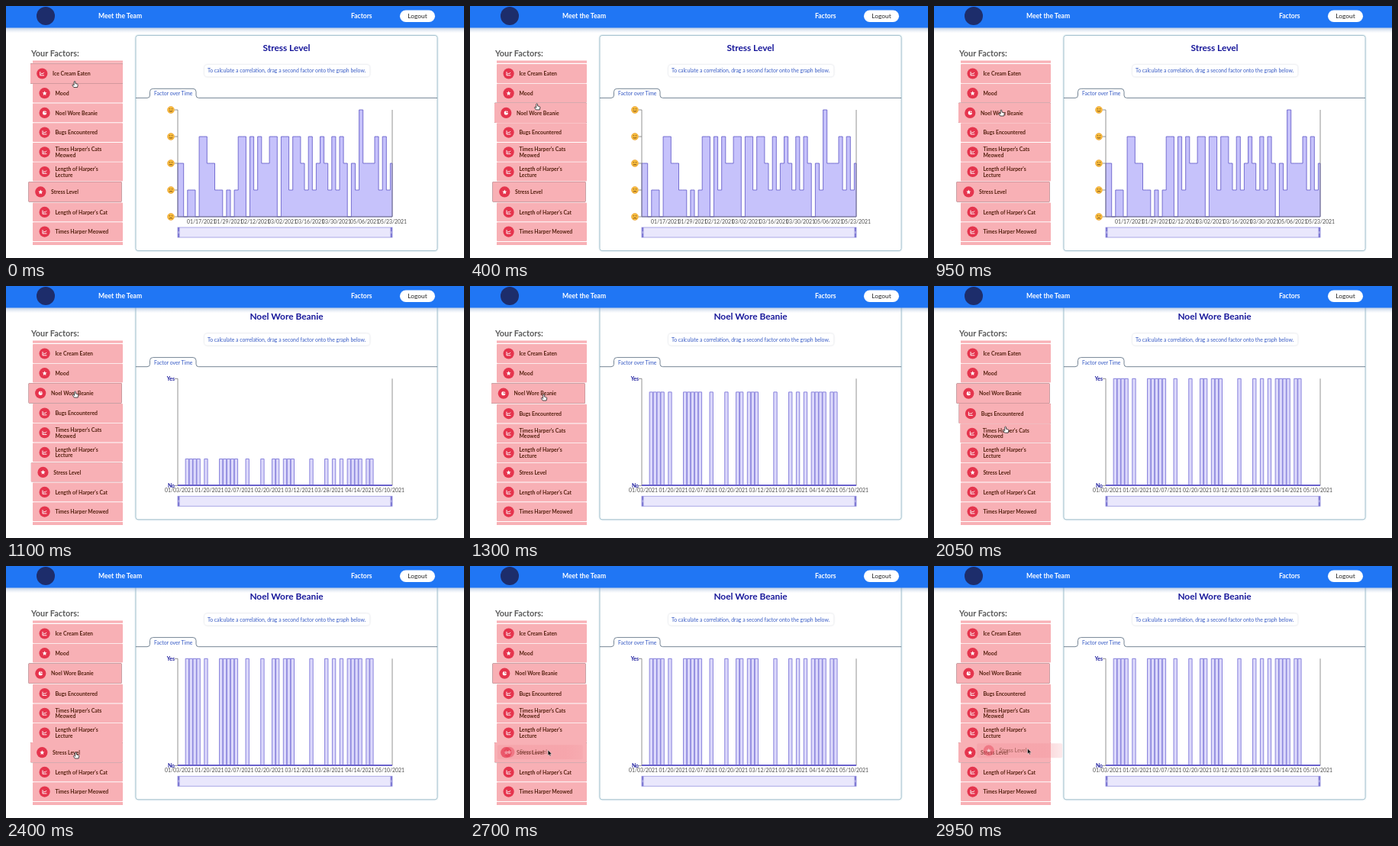
Animation of 600 by 330 pixels, one loop 3000 ms. Source, as an HTML page:

```html
<!DOCTYPE html>
<html lang="en">
<head>
<meta charset="utf-8">
<title>Factor dashboard</title>
<style>
html, body { margin: 0; width: 100%; height: 100%; overflow: hidden; background: #fff; }
svg { display: block; width: 600px; height: 330px; font-family: Lato, "Open Sans", sans-serif; }
text { white-space: pre; }
</style>
</head>
<body>
<svg id="stage" viewBox="0 0 600 330">
  <defs>
    <linearGradient id="glow" x2="0" y2="1">
      <stop stop-color="#6f93c4" stop-opacity=".5"/>
      <stop offset="1" stop-color="#b5c8e2" stop-opacity="0"/>
    </linearGradient>
    <linearGradient id="ghostFill">
      <stop offset=".8" stop-color="#f3959d" stop-opacity=".38"/>
      <stop offset="1" stop-color="#f3959d" stop-opacity=".2"/>
    </linearGradient>
  </defs>
</svg>
<script>
const LOOP = 3000, CLICK = 1050, DRAG = 2650, GROW = 400;
const PITCH = 25.7, FIRST = 88.5, EXTRA = 1.5;
const LEFT = 225, RIGHT = 506, TOP = 136, BASE = 276, SPAN = RIGHT - LEFT;
const PINK = '#f8b0b5', RED = '#e5344d', NAVY = '#17179a', VIOLET = '#6a62cc';
const stage = document.getElementById('stage');

function el(parent, tag, attrs = {}, text) {
  const node = document.createElementNS('http://www.w3.org/2000/svg', tag);
  set(node, attrs);
  if (text) node.textContent = text;
  parent.append(node);
  return node;
}
function set(node, attrs) {
  for (const key in attrs) node.setAttribute(key, attrs[key]);
}
// y is the middle of the capitals
function label(parent, text, x, y, size, fill, attrs = {}) {
  return el(parent, 'text', { x, y: y + size * .36, 'font-size': size, fill, ...attrs }, text);
}
const bold = { 'font-weight': 700 };
const centred = { 'text-anchor': 'middle' };
const show = (node, on) => { node.style.display = on ? '' : 'none'; };

// Panel
const panel = el(stage, 'g');
const frame = el(panel, 'rect', { x: 170, y: 38.5, width: 395, height: 282, rx: 3, fill: '#fff', stroke: '#9dbdca', 'stroke-width': .9 });
frame.style.filter = 'drop-shadow(0 0 1px rgba(130,180,200,.45))';
const title = label(panel, '', 367.5, 54.3, 11.9, NAVY, { ...bold, ...centred });
const tip = el(panel, 'rect', { x: 260, y: 77, width: 216.5, height: 15.5, rx: 4, fill: '#fff' });
tip.style.filter = 'drop-shadow(0 .8px 1px rgba(60,70,110,.24))';
label(panel, 'To calculate a correlation, drag a second factor onto the graph below.',
  367.6, 84.8, 6.88, '#3559c4', centred);
el(panel, 'path', { d: 'M170 120.4H185Q188.5 120.4 188.5 117V112.3Q188.5 108.3 192.5 108.3H245Q249 108.3 249 112.3V117Q249 120.4 252.5 120.4H565',
  fill: 'none', stroke: '#66788a', 'stroke-width': .9 });
label(panel, 'Factor over Time', 219.3, 114.8, 6.9, '#3559c4', centred);

// Charts
function dates(group, days, xs) {
  days.split(' ').forEach((day, i) => label(group, day + '/2021', xs[i], 282.3, 6.85, '#4c4c4c', centred));
}
function axes(group, rows) {
  let d = `M${LEFT} ${TOP}V${BASE}H${RIGHT}V${TOP}`;
  for (let i = 0; i < rows; i++) d += `M${LEFT - 4} ${TOP + i * 140 / (rows - 1)}h4`;
  el(group, 'path', { d, fill: 'none', stroke: '#777', 'stroke-width': .8 });
}
function face(group, y, mood) {
  const g = el(group, 'g', { transform: `translate(216 ${y})` });
  el(g, 'circle', { r: 4.5, fill: '#f8bd3d', stroke: '#e2932b', 'stroke-width': .5 });
  el(g, 'path', { d: `M-2.3 -1.2h1.5M.8 -1.2h1.5M-2.2 ${1.8 - mood * .4}Q0 ${1.8 + mood} 2.2 ${1.8 - mood * .4}`,
    fill: 'none', stroke: '#70431c', 'stroke-width': .9 });
}

const stress = el(panel, 'g');
const levels = '33122144332212124414243344144244324234324243132533342423';
function stepArea() {
  const unit = SPAN / (levels.length - 1);
  let d = `M${LEFT} ${BASE}`;
  [...levels].forEach((level, i) => {
    d += `V${BASE - (level - 1) * 35}H${Math.min(RIGHT, LEFT + (i + .5) * unit).toFixed(1)}`;
  });
  return d + `V${BASE}Z`;
}
el(stress, 'path', { d: stepArea(), fill: '#c6c2fb', stroke: VIOLET, 'stroke-width': .9 });
axes(stress, 5);
[1.4, .9, 0, -.7, -1.3].forEach((mood, i) => face(stress, TOP + i * 35, mood));
dates(stress, '01/17 01/29 02/12 03/02 03/16 03/30 05/06 05/23', [256, 291.5, 327, 362, 398, 433, 470, 506]);

const beanie = el(panel, 'g');
const worn = [2, 3, 4, 5, 7, 11, 12, 13, 14, 15, 18, 22, 25, 26, 28, 29, 30, 35, 39, 41, 43, 45, 46, 47, 48, 50, 51];
axes(beanie, 2);
const bars = el(beanie, 'path', { fill: '#dcd9fb', stroke: '#8882dc', 'stroke-width': 1 });
el(beanie, 'path', { d: `M${LEFT} ${BASE - .3}H${RIGHT}`, stroke: VIOLET, 'stroke-width': 1.8 });
['Yes', 'No'].forEach((word, i) =>
  label(beanie, word, 221, TOP + i * 140, 6.8, NAVY, { ...bold, 'text-anchor': 'end' }));
dates(beanie, '01/03 01/20 02/07 02/20 03/12 03/28 04/14 05/10', [227, 266.5, 305.5, 345, 384.5, 423.5, 463.5, 503]);

el(panel, 'rect', { x: LEFT, y: 290, width: SPAN, height: 13, fill: '#e9e7fc', stroke: '#a29fe2', 'stroke-width': .9 });
for (const x of [LEFT, RIGHT - 2.4]) {
  el(panel, 'rect', { x, y: 290, width: 2.4, height: 13, fill: '#7f7ad4' });
  el(panel, 'path', { d: `M${x + 1.2} 295v3`, stroke: '#fff', 'stroke-width': .6 });
}

// Header
el(stage, 'rect', { y: 28, width: 600, height: 7.5, fill: 'url(#glow)' });
el(stage, 'rect', { width: 600, height: 28.5, fill: '#2076f4' });
el(stage, 'circle', { cx: 52, cy: 13, r: 12, fill: '#1d2d6b' });
label(stage, 'Meet the Team', 121, 13.3, 8.6, '#fff', bold);
label(stage, 'Factors', 452, 13.3, 8.5, '#fff', bold);
el(stage, 'rect', { x: 516, y: 5.5, width: 46, height: 15.5, rx: 7.75, fill: '#fff' });
label(stage, 'Logout', 539, 13.3, 8.4, '#222', centred);

// Factor list
label(stage, 'Your Factors:', 33, 62, 10.9, '#5a5a5a', bold);
el(stage, 'rect', { x: 35, y: 71.5, width: 118, height: 3.2, fill: PINK });
el(stage, 'rect', { x: 35, y: 309, width: 118, height: 4, fill: PINK });

const glyphs = {
  chart: ['M-3 -2.8V2.7H3.2M-1.8 1L-.4 -.7L.8 .5L2.8 -1.8', 'none', '#fff'],
  star: ['M0 -3.5L1.05 -1.2L3.5 -.95L1.65 .75L2.15 3.2L0 1.95L-2.15 3.2L-1.65 .75L-3.5 -.95L-1.05 -1.2Z', '#fff', 'none'],
  pie: ['M0 -3A3 3 0 1 0 3 0H0ZM.8 -3A3 3 0 0 1 3 -.8H.8Z', '#fff', 'none']
};
function content(parent, kind, name) {
  const g = el(parent, 'g');
  const [d, fill, stroke] = glyphs[kind];
  el(g, 'circle', { cx: 50.6, r: 7.1, fill: RED });
  el(g, 'path', { d, fill, stroke, 'stroke-width': 1.1, transform: 'translate(50.6 0) scale(.86)' });
  const lines = name.split('|');
  lines.forEach((line, i) =>
    label(g, line, 64.4, (i - (lines.length - 1) / 2) * 7.8 + .2, 6.88, '#54200f', bold));
  return g;
}
const list = el(stage, 'g');
const rows = [
  ['chart', 'Ice Cream Eaten'], ['star', 'Mood'], ['pie', 'Noel Wore Beanie'],
  ['chart', 'Bugs Encountered'], ['chart', "Times Harper's Cats|Meowed"],
  ['chart', "Length of Harper's|Lecture"], ['star', 'Stress Level'],
  ['chart', "Length of Harper's Cat"], ['chart', 'Times Harper Meowed']
].map(([kind, name]) => {
  const g = el(list, 'g');
  const card = el(g, 'rect', { rx: 1, fill: PINK });
  return { g, card, body: content(g, kind, name) };
});

// Dragged copy and pointer
const ghost = el(stage, 'g');
el(ghost, 'rect', { x: 31.7, y: -9.5, width: 112, height: 19, rx: 2, fill: 'url(#ghostFill)' });
set(content(ghost, 'star', 'Stress Level'), { transform: 'translate(-3.4 0)', opacity: .4 });
const hand = el(stage, 'path', {
  d: 'M-.9 .6Q0 -.6 .9 .6V3L3.4 3.7Q4.4 4 4.2 5L3.6 8H-1.2L-3.2 5.2Q-3 4 -1.8 4.6L-.9 5.4Z',
  fill: '#fff', stroke: '#222', 'stroke-width': .8
});
const arrow = el(stage, 'path', {
  d: 'M0 0V7L1.6 5.6L2.7 8L3.8 7.5L2.8 5.2H5Z', fill: '#111', stroke: '#fff', 'stroke-width': .4
});

// time, x, y of the pointer tip
const track = [
  [0, 90, 98.5], [60, 90, 99], [280, 88, 127.6], [450, 87.5, 128], [700, 88, 134], [950, 88, 136],
  [1050, 89, 137], [1300, 96.5, 142], [1700, 95, 141.5], [1900, 95, 146], [2280, 91.5, 242],
  [2400, 91.5, 244], [2650, 98, 241.5], [2950, 122.5, 239], [3000, 124, 238.5]
];
function pointer(t) {
  const i = Math.max(1, track.findIndex(key => key[0] >= t));
  const [a, b] = [track[i - 1], track[i]];
  const p = Math.max(0, (t - a[0]) / (b[0] - a[0]));
  return [a[1] + (b[1] - a[1]) * p, a[2] + (b[2] - a[2]) * p];
}
const chosenAt = t => t < CLICK ? 6 : 2;
function hoveredAt(t) {
  if (t >= DRAG) return 6;
  const y = pointer(t)[1] - FIRST + PITCH / 2;
  const row = Math.floor(y / PITCH);
  return row > chosenAt(t) ? Math.floor((y - EXTRA) / PITCH) : row;
}
// Share of the last 100 ms in which the row was picked
function recent(pick, row, t) {
  let hits = 0;
  for (let k = 0; k < 10; k++) hits += pick(Math.max(0, t - k * 10)) === row;
  return hits / 10;
}

function drawRows(t) {
  let push = 0;
  rows.forEach((row, i) => {
    const h = recent(hoveredAt, i, t), s = recent(chosenAt, i, t);
    const both = h * s;
    const y = FIRST + i * PITCH + push + s * EXTRA / 2;
    push += s * EXTRA;
    row.lift = Math.max(h, s);
    const left = 35 - 3 * h - 5.5 * s + 1.5 * both;
    const right = 153 - 1.5 * s - .8 * both;
    const tall = 24.8 + 1.5 * row.lift;
    set(row.card, { x: left, y: y - tall / 2, width: right - left, height: tall });
    set(row.body, { transform: `translate(${-3.3 * h - 5.3 * s + 1.8 * both} ${y})` });
    row.g.firstChild.style.filter = row.lift
      ? `drop-shadow(.6px .8px .7px rgba(40,25,30,${.95 * row.lift}))` : 'none';
  });
  list.append(...[...rows].sort((a, b) => a.lift - b.lift).map(row => row.g));
}

function drawBars(t) {
  const p = Math.min(1, Math.max(0, (t - CLICK) / GROW));
  const tall = (BASE - TOP) * (1 - (1 - p) ** 2.1);
  const unit = SPAN / 57;
  set(bars, { d: worn.map(i => `M${LEFT + i * unit + .3} ${BASE}v${-tall}h${unit - .6}v${tall}z`).join('') });
}

function draw(t) {
  const clicked = t >= CLICK, dragging = t >= DRAG;
  show(stress, !clicked);
  show(beanie, clicked);
  title.textContent = clicked ? 'Noel Wore Beanie' : 'Stress Level';
  set(panel, { transform: `translate(0 ${clicked ? -14.7 : 0})` });
  drawBars(t);
  drawRows(t);
  const [x, y] = pointer(t);
  const [x0, y0] = pointer(DRAG);
  show(ghost, dragging);
  show(arrow, dragging);
  show(hand, !dragging);
  set(ghost, { transform: `translate(${x - x0} ${244.2 + y - y0})` });
  set(dragging ? arrow : hand, { transform: `translate(${x} ${y})` });
}

const start = performance.now();
function tick() {
  draw((performance.now() - start) % LOOP);
  requestAnimationFrame(tick);
}
tick();
</script>
</body>
</html>
```
